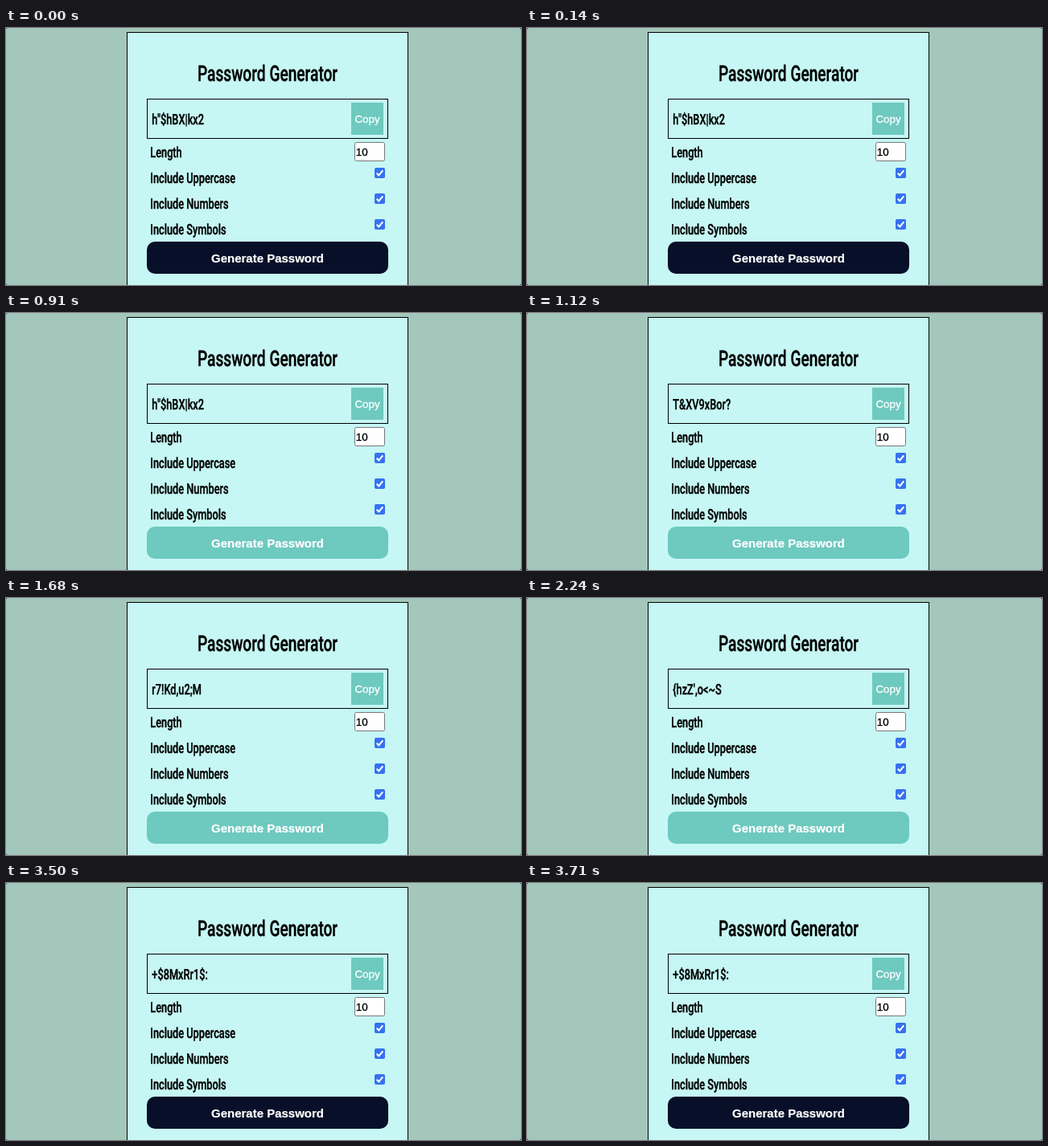
Recreate the animation shown at these times as an HTML page. Size 640x320 px, loop 3.99 s.

```html
<!DOCTYPE html>
<html lang="en">
<head>
<meta charset="utf-8">
<title>Password Generator</title>
<style>
  html, body { margin: 0; width: 100%; height: 100%; overflow: hidden; background: #222; }
  svg { display: block; width: 640px; height: 320px; }
  .narrow { font: 500 18px Roboto, sans-serif; text-rendering: geometricPrecision; stroke: #000; stroke-width: .4px; }
  .title { font-size: 27px; }
  .control { font: 13.333px "Liberation Sans", Arial, sans-serif; stroke-width: .3px; }
  .action { font: bold 15px "Liberation Sans", Arial, sans-serif; stroke: #fff; stroke-width: .2px; }
</style>
</head>
<body>
<svg id="stage" viewBox="0 0 640 320" xmlns="http://www.w3.org/2000/svg"></svg>
<script>
const LOOP = 3990;
const HOVER = [420, 3500];
const PASSWORDS = [
  [0, 'h"$hBX|kx2'],
  [1120, 'T&XV9xBor?'],
  [1610, 'r7!Kd,u2;M'],
  [2240, "{hzZ',o<~S"],
  [3430, '+$8MxRr1$:']
];
const TEAL = '#6ec9bf';
const NAVY = '#081029';
const CONDENSED = 0.7085;

const stage = document.getElementById('stage');

function add(tag, attrs, content = '') {
  const node = document.createElementNS(stage.namespaceURI, tag);
  for (const key in attrs) node.setAttribute(key, attrs[key]);
  node.textContent = content;
  return stage.appendChild(node);
}

const box = (x, y, width, height, fill, more) =>
  add('rect', { x, y, width, height, fill, ...more });

const narrow = (x, y, content, more) =>
  add('text', { class: 'narrow', transform: `translate(${x} ${y}) scale(${CONDENSED} 1)`, ...more }, content);

function checkbox(x, y) {
  box(x, y, 13, 13, '#3572f1', { rx: 2 });
  add('path', {
    d: `M${x + 2.7} ${y + 6.8}l2.6 2.6l5-6`,
    fill: 'none', stroke: '#fff', 'stroke-width': 2
  });
}

box(0, 0, 640, 320, '#a3c7ba', { rx: 2 });
box(150.5, 5.5, 349, 330, '#c6f7f4', { stroke: '#000' });
narrow(325, 65.6, 'Password Generator', { class: 'narrow title', 'text-anchor': 'middle' });

box(175.5, 88.5, 299, 49, 'none', { stroke: '#000' });
const password = narrow(181.3, 120, '');
box(429, 93, 40, 40, TEAL);
add('text', { class: 'control', x: 449, y: 118, fill: '#fff', stroke: '#fff', 'text-anchor': 'middle' }, 'Copy');

['Length', 'Include Uppercase', 'Include Numbers', 'Include Symbols'].forEach((label, row) => {
  narrow(179.3, 161 + row * 32, label);
  if (row) checkbox(458, 142 + row * 32);
});
box(433.5, 142.5, 37, 23, '#fff', { rx: 2, stroke: '#767676' });
add('text', { class: 'control', x: 434.8, y: 159, stroke: '#000' }, '10');

const button = box(175, 266, 300, 40, NAVY, { rx: 10 });
add('text', { class: 'action', x: 325, y: 292, fill: '#fff', 'text-anchor': 'middle' }, 'Generate Password');

function render(time) {
  const hovered = time >= HOVER[0] && time < HOVER[1];
  button.setAttribute('fill', hovered ? TEAL : NAVY);
  password.textContent = PASSWORDS.filter(([from]) => from <= time).pop()[1];
}

const start = performance.now();
function tick() {
  render((performance.now() - start) % LOOP);
  requestAnimationFrame(tick);
}
tick();
</script>
</body>
</html>
```
